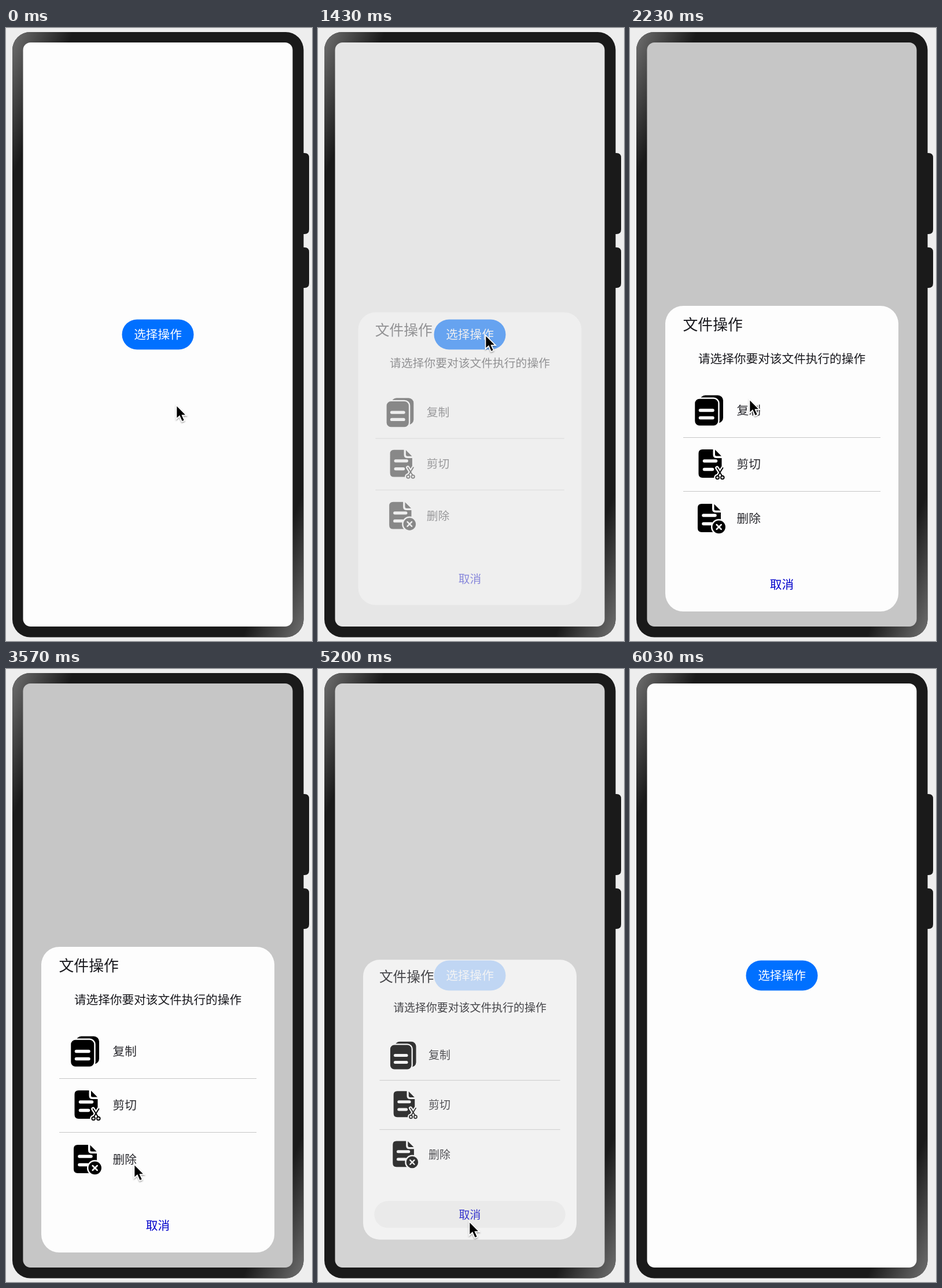
Recreate the animation shown at these times as an HTML page. Size 529 by 1059 pixels, loop 6.11 s.

```html
<!DOCTYPE html>
<html lang="zh-CN">
<head>
<meta charset="utf-8">
<style>
  html, body { margin: 0; width: 100%; height: 100%; overflow: hidden; background: #eee; }
  svg { display: block; width: 529px; height: 1059px; }
  text { font: 20.67px "Noto Sans CJK SC", "Noto Sans CJK", sans-serif; fill: #18181d; }
  .mid { text-anchor: middle; }
</style>
</head>
<body>
<svg viewBox="0 0 529 1059">
  <defs>
    <linearGradient id="shineA" gradientUnits="userSpaceOnUse" x1="20" y1="9" x2="101" y2="43">
      <stop offset="0" stop-color="#686868"/>
      <stop offset="1" stop-color="#686868" stop-opacity="0"/>
    </linearGradient>
    <linearGradient id="shineB" href="#shineA" x1="505" y1="1050" x2="424" y2="1016"/>
    <g id="page">
      <path d="M7 0H25V9q0 6 6 6H40V42q0 7-7 7H7q-7 0-7-7V7q0-7 7-7zM28.5 .5 39.5 11.5H31q-2.5 0-2.5-2.5z"/>
      <path d="M10 20H30M10 34.5H24" stroke="#fdfdfd" stroke-width="5.5" stroke-linecap="round"/>
    </g>
    <path id="scissors" d="M150.5 760 159 773.5M160.5 760 152 773.5M154 776.5a2.8 2.8 0 1 1-5.6 0a2.8 2.8 0 1 1 5.6 0M162.600 776.500a2.8 2.8 0 1 1-5.6 0a2.8 2.8 0 1 1 5.6 0" fill="none" stroke-linecap="round"/>
    <filter id="soft" x="-50%" y="-50%" width="200%" height="200%">
      <feDropShadow dx="0" dy="1.5" stdDeviation="1.3" flood-opacity=".4"/>
    </filter>
  </defs>

  <!-- phone -->
  <path d="M514 216h2q8 0 8 8V348q0 8-8 8h-2zM514 379h2q8 0 8 8v54q0 8-8 8h-2z" fill="#1a1a1a"/>
  <g id="body">
    <rect x="11" y="7" width="503.500" height="1045.500" rx="31" fill="#1a1a1a"/>
    <rect x="11" y="7" width="503.500" height="1045.500" rx="31" fill="url(#shineA)"/>
    <rect x="11" y="7" width="503.500" height="1045.500" rx="31" fill="url(#shineB)"/>
  </g>
  <rect x="29.500" y="25" width="466" height="1009" rx="13" fill="#fdfdfd"/>

  <rect x="200.500" y="503.500" width="124" height="52" rx="26" fill="#0070ff"/>
  <text class="mid" x="262.500" y="537" style="fill:#fff;font-weight:500">选择操作</text>

  <rect id="dim" x="29.500" y="25" width="466" height="1009" rx="13"/>

  <g id="dialog">
    <rect x="61" y="480" width="403" height="528" rx="31" fill="#fdfdfd"/>
    <text x="91.500" y="521.500" style="font-size:25.83px">文件操作</text>
    <text class="mid" x="262.500" y="578.500">请选择你要对该文件执行的操作</text>
    <path d="M92 707.500H433M92 800.500H433" stroke="#c6c6c6"/>

    <rect x="121" y="634.500" width="40" height="48" rx="9"/>
    <rect x="111" y="639.500" width="42.500" height="48.500" rx="9" stroke="#fdfdfd" stroke-width="2.500"/>
    <path d="M121.500 660.500H143M121.500 673.500H143" stroke="#fdfdfd" stroke-width="5.500" stroke-linecap="round"/>

    <use href="#page" x="118.500" y="728"/>
    <use href="#scissors" stroke="#fdfdfd" stroke-width="6.500"/>
    <use href="#scissors" stroke="#000" stroke-width="1.900"/>

    <use href="#page" x="117" y="822"/>
    <circle cx="153.700" cy="862" r="12.500" stroke="#fdfdfd" stroke-width="2.500"/>
    <path d="M149.700 858l8 8m0-8l-8 8" stroke="#fdfdfd" stroke-width="2.500" stroke-linecap="round"/>

    <g style="opacity:.92">
      <text x="184.500" y="668">复制</text>
      <text x="184.500" y="761">剪切</text>
      <text x="184.500" y="855">删除</text>
    </g>
    <rect id="press" x="82" y="935" width="361" height="51" rx="25.500"/>
    <text class="mid" x="262.500" y="968.600" style="fill:#0000cc">取消</text>
  </g>

  <path id="cursor" filter="url(#soft)" d="M-.5-.5V23.300L4.900 18.500 9.100 28 13.700 26 9.700 17.200H17z" fill="#000" stroke="#fff" stroke-width="1.700"/>
</svg>

<script>
const LOOP = 6110;
const [dim, dialog, press, cursor] = ["dim", "dialog", "press", "cursor"].map(id => document.getElementById(id));

// start, end, then the position reached
const moves = [
  [30, 630, 296, 552],
  [670, 870, 291, 534],
  [870, 1270, 290, 531],
  [1900, 2230, 207, 642],
  [2700, 3000, 224, 752],
  [3370, 3570, 222, 856],
  [3970, 4570, 262, 955]
];

const part = (t, a, b) => Math.min(1, Math.max(0, (t - a) / (b - a)));
const smooth = p => p * p * (3 - 2 * p);
const easeOut = p => 1 - (1 - p) ** 3;

function draw(t) {
  let x = 295, y = 652;
  for (const [a, b, toX, toY] of moves) {
    const p = smooth(part(t, a, b));
    x += (toX - x) * p;
    y += (toY - y) * p;
  }
  cursor.setAttribute("transform", `translate(${x} ${y})`);
  cursor.style.visibility = t < 5560 ? "visible" : "hidden";

  const shown = part(t, 1290, 1640) - part(t, 5095, 5535);
  const scale = 0.85 + 0.15 * (easeOut(part(t, 1290, 1700)) - easeOut(part(t, 5095, 5535)));
  dim.style.opacity = 0.22 * shown;
  dialog.style.opacity = shown;
  dialog.setAttribute("transform", `translate(262.5 744) scale(${scale}) translate(-262.5 -744)`);
  press.style.opacity = 0.045 * part(t, 4970, 5070);
}

const start = performance.now();
function frame() {
  draw((performance.now() - start) % LOOP);
  requestAnimationFrame(frame);
}
frame();
</script>
</body>
</html>
```
